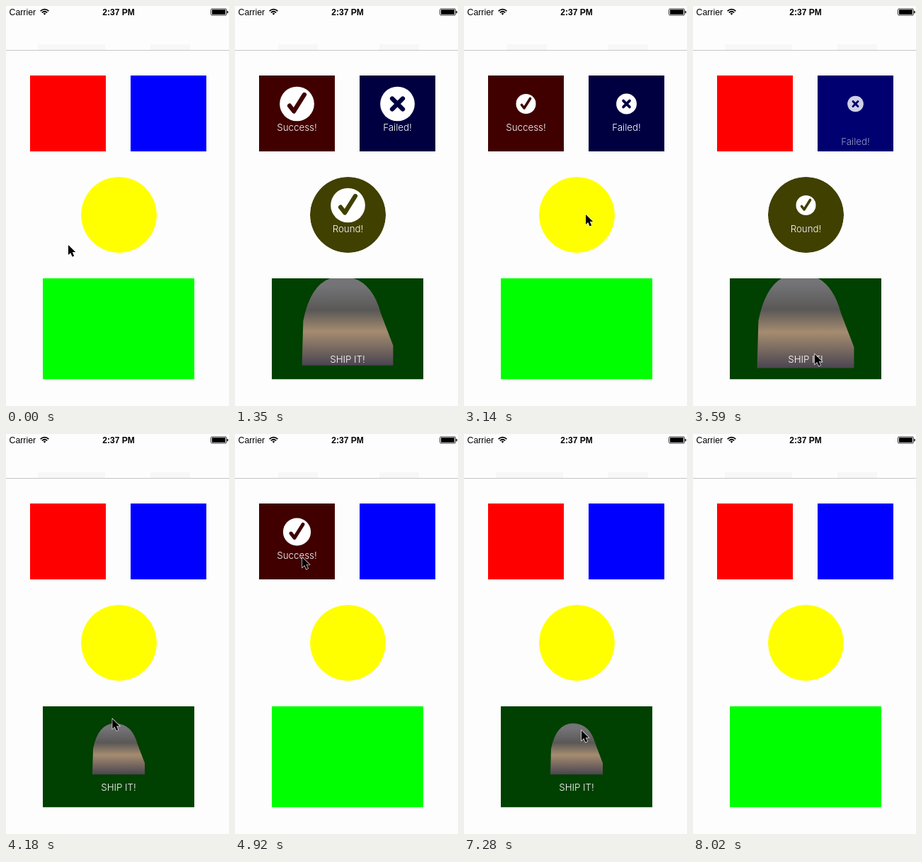
Recreate the animation shown at these times as an HTML page. Size 315 by 564 pixels, loop 8670 ms.

```html
<!DOCTYPE html>
<html lang="en">
<head>
<meta charset="utf-8">
<title>Overlay demo</title>
<style>
  html, body { margin: 0; width: 100%; height: 100%; overflow: hidden; background: #fdfdfd; }
  svg { display: block; width: 315px; height: 564px; }
  .bar { font: 12.3px "Liberation Sans", Arial, sans-serif; }
  .time { font-size: 12px; font-weight: bold; text-anchor: middle; }
  .label { font: 300 13.3px Inter, "Liberation Sans", sans-serif; fill: #fff; text-anchor: middle; }
</style>
</head>
<body>
<svg viewBox="0 0 315 564">
  <defs>
    <linearGradient id="photo" x2="0" y2="1">
      <stop offset=".1" stop-color="#747477"/>
      <stop offset=".38" stop-color="#5a5856"/>
      <stop offset=".62" stop-color="#a58c70"/>
      <stop offset="1" stop-color="#4a4550"/>
    </linearGradient>
  </defs>
  <g fill="#f7f7f7">
    <rect id="shade" x="45" y="54" width="95" height="8"/>
    <rect x="204" y="54" width="56" height="8"/>
  </g>
  <rect y="62" width="315" height="1" fill="#c6c6c6"/>
  <text class="bar" x="4.5" y="12.5">Carrier</text>
  <text class="bar time" x="159" y="12.5">2:37 PM</text>
  <g fill="none" stroke="#000" stroke-width="1.7">
    <path d="M48.6 7.2Q54.5 1.9 60.4 7.2M50.8 9.4Q54.5 6.1 58.2 9.4"/>
    <path d="M52.6 10.6Q54.5 9 56.4 10.6L54.5 12.7Z" fill="#000" stroke="none"/>
    <rect x="289.5" y="4" width="22" height="9" rx="1.5" stroke-width=".8"/>
    <path d="M291 8.5H310" stroke-width="6.6"/>
    <path d="M313 7V10.2" stroke-width="1.4"/>
  </g>
  <g id="views"></g>
  <path id="cursor" d="M0 0V14L3.2 11L5.6 16.6L8.2 15.5L5.8 10H10.2Z"
        stroke="#fff" stroke-width="1.2" paint-order="stroke"/>
</svg>
<script>
const LOOP = 8670, LIFE = 750, FADE = 250, POP = 130, SETTLE = 300;
const $ = id => document.getElementById(id);
const clamp = v => Math.max(0, Math.min(1, v));

const disc = mark => `<circle r="14" fill="#fff"/><path class="mark" d="${mark}" fill="none"
  stroke-linecap="round" stroke-linejoin="round" stroke-width="3.6"/>`;
const check = disc("M-6 1.5L-2.5 6L6 -7.5");
const cross = disc("M-4.3 -4.3L4.3 4.3M4.3 -4.3L-4.3 4.3");
const photo = `<path fill="url(#photo)"
  d="M-37 36L-36 0Q-29 -36 -5 -36Q19 -36 27 -6L37 20V36Z"/>`;
const rect = (x, y, w, h) => `<rect x="${x}" y="${y}" width="${w}" height="${h}"/>`;

// starts: when each overlay opens
const views = [
  { rgb: [255, 0, 0], shape: rect(34, 98, 107, 107), x: 87.5, y: 138, drop: 38,
    icon: check, label: "Success!", starts: [1200, 2540, 4696] },
  { rgb: [0, 0, 255], shape: rect(176, 98, 107, 107), x: 229.5, y: 138, drop: 38,
    icon: cross, label: "Failed!", starts: [1200, 2767, 5150] },
  { rgb: [255, 255, 0], shape: `<circle cx="159.5" cy="294.5" r="53.5"/>`, x: 159.5, y: 281, drop: 38,
    icon: check, label: "Round!", starts: [1200, 3142, 5820] },
  { rgb: [0, 255, 0], shape: rect(52, 384, 214, 142.5), x: 159, y: 444, drop: 59,
    icon: photo, label: "SHIP IT!", starts: [1200, 3450, 6685] }
];

$("views").innerHTML = views.map((v, i) => `
  <clipPath id="clip${i}">${v.shape}</clipPath>
  <g id="view${i}" clip-path="url(#clip${i})">
    <g class="back">${v.shape}</g>
    <g class="icon">${v.icon}</g>
    <text class="label" x="${v.x}">${v.label}</text>
  </g>`).join("");

views.forEach((v, i) => {
  for (const part of ["back", "icon", "label", "mark"])
    v[part + "El"] = $("view" + i).querySelector("." + part);
});

// The picture advances in runs of even steps: [first, last, count]
const runs = [[0, 0, 1], [750, 750, 1], [1350, 1800, 4], [2100, 3140, 8], [3290, 4330, 8],
  [4480, 5510, 8], [5660, 6400, 6], [6700, 7280, 5], [7580, 8020, 4]];
const steps = runs.flatMap(([a, b, n]) =>
  Array.from({ length: n }, (_, i) => Math.floor((a + (n > 1 ? (b - a) * i / (n - 1) : 0)) / 10) * 10));

// Pointer path: [time, x, y]
const path = [[0, 88, 337], [1800, 84, 228], [2100, 84, 228], [2500, 100, 165], [2540, 100, 165],
  [2760, 218, 165], [2800, 218, 165], [3140, 172, 294], [3290, 172, 294], [3440, 172, 491],
  [3900, 172, 491], [4700, 95, 174], [4920, 95, 174], [5120, 222, 172], [5250, 222, 172],
  [5780, 165, 296], [5960, 165, 296], [6400, 166, 418], [7580, 166, 418], [7870, 170, 533]];

function pointer(t) {
  const i = path.findIndex(p => p[0] > t);
  if (i < 0) return path[path.length - 1].slice(1);
  const [t0, x0, y0] = path[i - 1], [t1, x1, y1] = path[i];
  const q = (t - t0) / (t1 - t0), e = q * q * (3 - 2 * q);
  return [x0 + (x1 - x0) * e, y0 + (y1 - y0) * e];
}

// Visibility k and icon scale of an overlay
function overlay(v, t) {
  const start = v.starts.find(s => t >= s && t < s + LIFE + FADE);
  if (start === undefined) return { k: 0, scale: 0 };
  const age = t - start;
  if (age > LIFE) {
    const k = 1 - (age - LIFE) / FADE;
    return { k, scale: .25 + .75 * k };
  }
  const k = clamp(age / POP);
  const rest = 1 - clamp((age - POP) / SETTLE);
  return { k, scale: age < POP ? 1.85 * k * (2 - k) : 1 + .85 * rest * rest };
}

function draw(t) {
  views.forEach((v, i) => {
    const { k, scale } = overlay(v, t);
    const color = `rgb(${v.rgb.map(c => Math.round(c * (1 - .75 * k)))})`;
    v.backEl.setAttribute("fill", color);
    if (v.markEl) v.markEl.setAttribute("stroke", color);
    v.iconEl.setAttribute("transform", `translate(${v.x} ${v.y}) scale(${scale})`);
    v.iconEl.setAttribute("opacity", k && Math.min(1, .25 + .75 * k));
    v.labelEl.setAttribute("y", v.y + v.drop + 80 * (1 - k));
    v.labelEl.setAttribute("opacity", clamp(1 - 1.6 * (1 - k)));
    if (i === 0) {
      $("shade").setAttribute("x", k ? 61 : 45);
      $("shade").setAttribute("width", k ? 56 : 95);
    }
  });
  const shown = t < 750 || (t >= 1800 && t < 8020);
  $("cursor").setAttribute("visibility", shown ? "visible" : "hidden");
  $("cursor").setAttribute("transform", `translate(${pointer(t)})`);
}

const begin = performance.now();
function tick() {
  const t = (performance.now() - begin) % LOOP;
  draw(steps.filter(s => s <= t).pop());
  requestAnimationFrame(tick);
}
tick();
</script>
</body>
</html>
```
